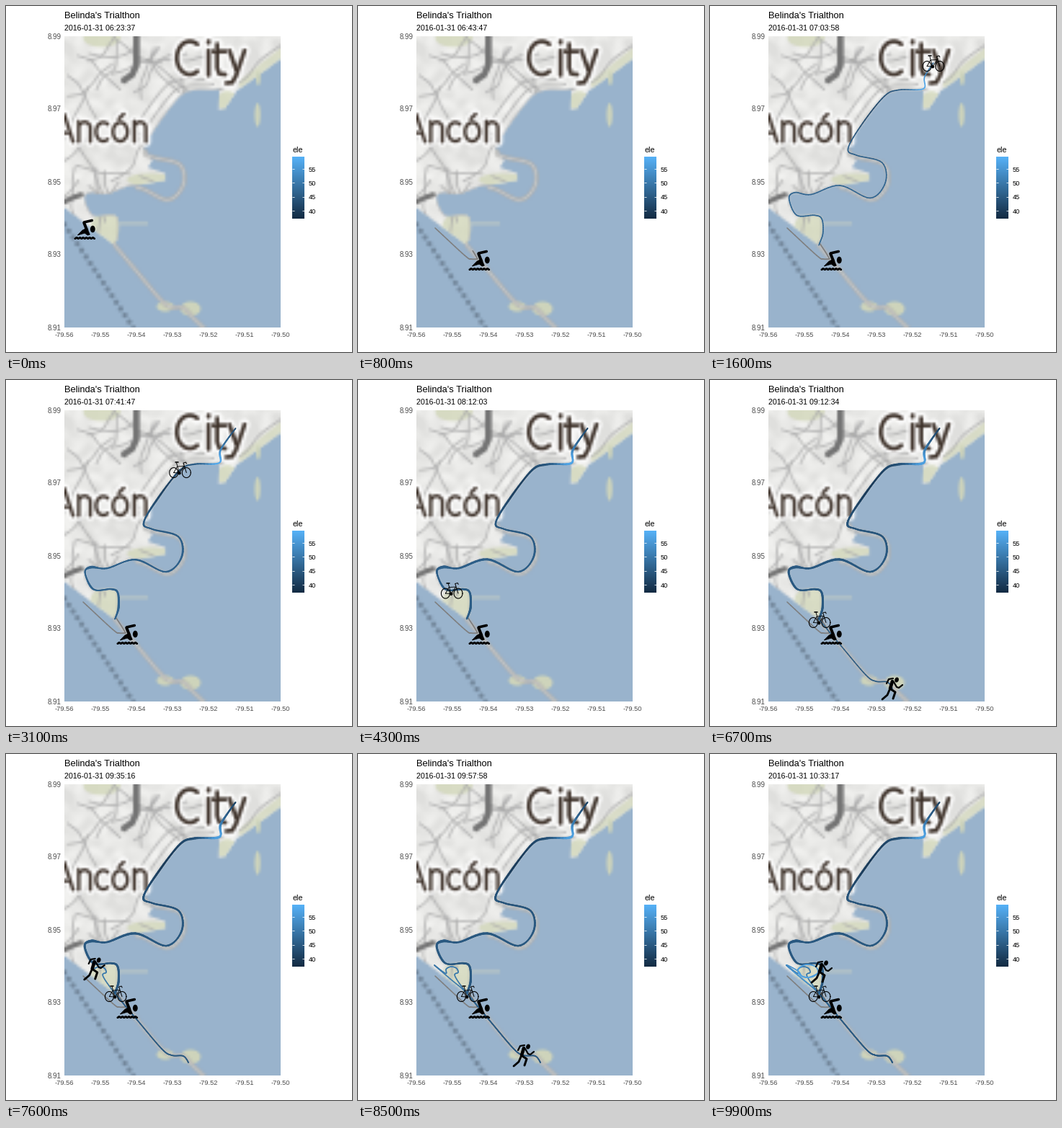
A matplotlib script for the animation above (10 s loop, 480x480 px).

```python
import numpy as np
import matplotlib.pyplot as plt
from matplotlib.animation import FuncAnimation
from matplotlib.collections import LineCollection
from matplotlib.colors import LinearSegmentedColormap
from matplotlib.lines import Line2D
from matplotlib.patches import Ellipse, Polygon
from matplotlib.path import Path
from matplotlib.transforms import Affine2D

SIZE, FRAMES = 480, 100
LEFT, RIGHT, TOP, BOTTOM = 81, 381, 42, 446
PT = 0.72  # points per pixel at 100 dpi
START, SPAN = 23017, 14980  # seconds of the day
ELE = LinearSegmentedColormap.from_list("ele", ["#132B43", "#56B1F7"])
ELE_MIN, ELE_MAX = 37.2, 59.4
STEPS = 8  # curve points per waypoint

plt.rcParams["font.family"] = "Liberation Sans"
rng = np.random.default_rng(7)


def smooth(pts):
    """Catmull-Rom curve through the waypoints."""
    p = np.array(pts, float)
    q = np.vstack([2 * p[0] - p[1], p, 2 * p[-1] - p[-2]])
    a, b, c, d = (q[k:len(p) - 1 + k, None] for k in range(4))
    u = np.linspace(0, 1, STEPS, endpoint=False)[None, :, None]
    curve = 0.5 * (2 * b + (c - a) * u + (2 * a - 5 * b + 4 * c - d) * u**2
                   + (3 * b - a - 3 * c + d) * u**3)
    return np.vstack([curve.reshape(-1, 2), p[-1:]])


def arc(cx, cy, rx, ry, start=0, stop=360, n=24):
    a = np.radians(np.linspace(start, stop, n))
    return np.column_stack([cx + rx * np.cos(a), cy + ry * np.sin(a)])


def near(x, y, cx, cy, r):
    return np.exp(-((x - cx) ** 2 + (y - cy) ** 2) / r**2)


# ---- courses: the bike road also gives the coastline ----
ROUTE = [(151, 332), (156, 316), (155, 295), (146, 290), (121, 290), (109, 267),
         (118, 259), (140, 261), (180, 249), (222, 266), (244, 245), (239, 217),
         (203, 207), (191, 198), (212, 163), (242, 125), (262, 117), (296, 115),
         (298, 97), (318, 67)]
OUT = [(151, 332), (182, 369), (216, 409), (230, 418), (246, 419), (253, 428)]
TIP, RETURN = (106, 293), (128, 312)
road = smooth(ROUTE)
south = road[:8 * STEPS + 1]
loop = road[8 * STEPS:13 * STEPS + 1]
north = road[13 * STEPS:17 * STEPS + 1]

# ---- base map: painted on a coarse grid, shown with bilinear scaling ----
COLS, ROWS = 88, 118
CELL = (RIGHT - LEFT) / COLS
GX, GY = np.meshgrid(LEFT + (np.arange(COLS) + 0.5) * CELL,
                     TOP + (np.arange(ROWS) + 0.5) * (BOTTOM - TOP) / ROWS)
base = np.full((ROWS, COLS, 3), (153.0, 179.0, 204.0))


def distance(pts):
    best = np.full(GX.shape, 1e9)
    for (x0, y0), (x1, y1) in zip(pts[:-1], pts[1:]):
        dx, dy = x1 - x0, y1 - y0
        u = ((GX - x0) * dx + (GY - y0) * dy) / max(dx * dx + dy * dy, 1e-9)
        u = np.clip(u, 0, 1)
        best = np.minimum(best, np.hypot(GX - x0 - u * dx, GY - y0 - u * dy))
    return best


def line(pts, width):
    return np.clip(0.5 + (width / 2 - distance(pts)) / CELL, 0, 1)


def area(pts):
    ring = np.vstack([pts, pts[:1]])
    inside = Path(ring).contains_points(np.column_stack([GX.ravel(), GY.ravel()]))
    sign = np.where(inside.reshape(GX.shape), 1, -1)
    return np.clip(0.5 + sign * distance(ring) / CELL, 0, 1)


def paint(mask, color):
    global base
    base = base + mask[..., None] * (np.asarray(color, float) - base)


def relief():
    z = rng.random((ROWS, COLS))
    for _ in range(5):
        z = (z + sum(np.roll(z, s, ax) for s in (-1, 1) for ax in (0, 1))) / 5
    return 5 * np.clip((z - z.mean()) / z.std(), -2, 2)


def street():
    """Wandering street that keeps to one of two crossing directions."""
    p = rng.uniform((LEFT, TOP), (250, 250))
    heading = rng.choice([0.3, 1.9]) + rng.normal(0, 0.25)
    pts = [p]
    for _ in range(4):
        heading += rng.normal(0, 0.3)
        pts.append(pts[-1] + 19 * np.array([np.cos(heading), np.sin(heading)]))
    return smooth(pts)


def letter_n(x, top, bottom):
    arch = arc(x + 8, top + 9, 8, 8, 180, 360, 12)
    return [[(x, top), (x, bottom)], np.vstack([arch, [(x + 16, bottom)]])]


def paint_label(strokes, pen):
    halo = np.max([line(s, pen + 10) for s in strokes], axis=0)
    ink = np.max([line(s, pen) for s in strokes], axis=0)
    paint(0.85 * halo, (255, 255, 255))
    paint(ink, (61, 49, 41))


def paint_map():
    global base
    land = area(np.vstack([
        [(60, 20), (420, 20), (420, 44), (352, 95), (320, 118), (304, 142),
         (295, 144), (296, 120)], north[::-1],
        [(203, 214), (197, 224), (221, 232), (221, 242)], south[::-1],
        [(81, 280), (60, 266)]]))
    paint(land, (233, 233, 231))
    base = base + (relief() * land)[..., None]

    for ellipse in [(140, 310, 24, 24), (200, 241, 32, 9), (307, 132, 14, 14),
                    (133, 44, 26, 13)]:
        paint(0.8 * area(arc(*ellipse)) * land, (212, 217, 188))
    paint(0.7 * line([(410, 44), (330, 108)], 14) * land, (212, 217, 188))
    for ellipse in [(221, 417, 12, 7), (256, 420, 14, 10), (349, 151, 4, 16),
                    (350, 100, 3, 10)]:
        paint(area(arc(*ellipse)), (206, 212, 187))
    paint(line([(158, 302), (195, 302)], 2.5), (205, 211, 196))

    streets = [street() for _ in range(34)]
    streets += [north - k * np.array([1, 0.7]) for k in (0, 9, 20)]
    streets += [south, smooth([(296, 116), (330, 102), (352, 76), (385, 52)])]
    for pts in streets:
        paint(0.8 * line(pts, 2.6) * land, (170, 170, 170))

    causeway = smooth(OUT[:5] + [(260, 433), (278, 450)])
    for pts in (loop + (2, 3), causeway):
        paint(0.8 * line(pts, 6.5), (178, 177, 175))
        paint(0.8 * line(pts, 1.5), (214, 214, 212))
    for pts, width in [([(181, 38), (181, 82), (175, 95), (164, 103)], 9),
                       ([(75, 275), (90, 267), (104, 262)], 7)]:
        paint(line(pts, width), (116, 116, 116))

    for u in np.linspace(0, 1, 17):
        dot = (81 + 96 * u, 303 + 144 * u)
        paint(line([dot, dot], 7), (114, 134, 154))

    paint_label([arc(255, 72, 18, 23, 55, 305),
                 [(281, 62), (281, 96)], [(281, 49), (281, 51)],
                 [(293, 53), (293, 86), (296, 94), (304, 95)],
                 [(287, 63), (304, 63)], [(310, 62), (321, 93)],
                 [(331, 62), (319, 97), (314, 106), (306, 107)]], 5.6)
    paint_label([[(70, 188), (81, 151), (93, 188)], [(74, 176), (89, 176)],
                 *letter_n(101, 160, 188), arc(135, 174.5, 10, 13, 55, 305),
                 arc(158.5, 174.5, 10, 13), [(157, 156), (163, 150)],
                 *letter_n(178, 160, 188)], 4.6)


paint_map()

# ---- figure ----
fig = plt.figure(figsize=(SIZE / 100, SIZE / 100), dpi=100, facecolor="white")
ax = fig.add_axes([0, 0, 1, 1])
ax.imshow(np.clip(base, 0, 255).astype(np.uint8), interpolation="bilinear",
          extent=(LEFT, RIGHT, BOTTOM, TOP), aspect="auto", zorder=0)
ax.imshow(np.linspace(1, 0, 86)[:, None], cmap=ELE, vmin=0, vmax=1,
          extent=(397, 414, 295, 209), aspect="auto", zorder=0)
ax.set(xlim=(0, SIZE), ylim=(SIZE, 0))
ax.axis("off")


def label(x, y, text, px=9.4, color="black", ha="left"):
    return ax.text(x, y, text, fontsize=px * PT, color=color, ha=ha, va="baseline")


label(81, 17, "Belinda's Trialthon", 12.9)
clock = label(81, 34, "", 10.6)
for k in range(5):
    label(77, 45.5 + 101 * k, f"{8.99 - 0.02 * k:.2f}", 9.8, "#4D4D4D", "right")
for k in range(7):
    label(81 + 49.9 * k, 459, f"{-79.56 + 0.01 * k:.2f}", 9.4, "#4D4D4D", "center")
label(397, 203, "ele", 10.6)
for k in range(4):
    y = 226 + 19.4 * k
    label(420, y + 3.7, str(55 - 5 * k))
    for x in (397, 410.6):
        ax.plot([x, x + 3.4], [y, y], color="white", lw=0.8 * PT, solid_capstyle="butt")


# ---- tracks ----
class Track:
    """Curve through waypoints; keys pair a time in steps with a waypoint."""

    def __init__(self, pts, keys):
        self.xy = smooth(pts)
        length = np.r_[0, np.cumsum(np.hypot(*np.diff(self.xy, axis=0).T))]
        times, stops = np.array(keys, float).T
        self.t = np.interp(length, length[(stops * STEPS).astype(int)], times)
        self.segs = np.stack([self.xy[:-1], self.xy[1:]], axis=1)
        self.line = LineCollection([], linewidths=1.6 * PT, capstyle="round",
                                   colors="#7F7F7F", zorder=2)
        ax.add_collection(self.line, autolim=False)

    def shade(self, height):
        ele = height(*self.xy.T, self.t)[:-1]
        self.line.set_color(ELE((ele - ELE_MIN) / (ELE_MAX - ELE_MIN)))

    def at(self, step):
        return [np.interp(step, self.t, self.xy[:, k]) for k in (0, 1)]

    def reveal(self, step):
        n = np.searchsorted(self.t, step, side="right")
        self.line.set_segments(self.segs[:max(n - 1, 0)])


def ride_height(x, y, t):
    return (47 + 12 * near(x, y, 293, 113, 16) - 5 * near(x, y, 225, 150, 45)
            - 4 * near(x, y, 322, 62, 16) + 3 * near(x, y, 298, 95, 14)
            - 0.05 * (t - 8))


def run_height(x, y, t):
    return 45 + near(x, y, 130, 302, 45) * (4 + 9 * ((t - 60) / 39) ** 2)


swim = Track([(107, 308), (148, 346), (157, 351), (166, 351)], [(0, 0), (7.6, 3)])
change = Track([(166, 351), (160, 341), (152, 329)], [(7.6, 0), (8.3, 2)])

last = len(ROUTE) - 1
ride = np.array(ROUTE + 3 * (ROUTE[-2::-1] + ROUTE[1:]), float)[:6 * last + 1]
ride += rng.normal(0, 0.45, ride.shape)
bike = Track(ride, [(8.3, 0), (16, last - 0.4), (31, 2 * last + 15),
                    (56, 6 * last - 9.5), (60.3, 6 * last)])
bike.shade(ride_height)

lap = OUT + OUT[-2::-1]
beach = [*arc(130, 302, 9, 7, 60, -200, 6), TIP, RETURN]
finish = [RETURN, TIP, *arc(136, 301, 14, 9, 180, -270, 9), (155, 302)]
jog = lap + beach + lap + finish
run = Track(jog, [(60.5, 0), (67, len(OUT) - 1),
                  (85, len(lap) + len(beach) + 3), (99, len(jog) - 1)])
run.shade(run_height)


# ---- icons, drawn around their own centre ----
class Icon:
    def __init__(self, zorder):
        self.move, self.parts, self.z = Affine2D(), [], zorder

    def add(self, part):
        part.set_transform(self.move + ax.transData)
        part.set_zorder(self.z)
        self.parts.append(ax.add_artist(part))

    def line(self, pts, width):
        x, y = zip(*pts)
        self.add(Line2D(x, y, color="black", lw=width * PT,
                        solid_capstyle="round", solid_joinstyle="round"))

    def blob(self, x, y, rx, ry, angle=0):
        self.add(Ellipse((x, y), 2 * rx, 2 * ry, angle=angle, fc="black", ec="none"))

    def place(self, xy, visible):
        self.move.clear().translate(*xy)
        for part in self.parts:
            part.set_visible(visible)


swimmer = Icon(4)
swimmer.line([(-1, -10), (10, -12.5)], 3.6)
swimmer.line([(-1, -9), (3, 1)], 4)
swimmer.add(Polygon([(-10, 8), (-3, 1), (3, -2), (7, 7), (4, 8), (0, 5)],
                    fc="black", ec="black", lw=0.6))
swimmer.blob(11, -0.5, 3.4, 4.8)
wave = np.linspace(-13.5, 13.5, 60)
swimmer.line(list(zip(wave, 12 + 0.7 * np.cos(wave * 1.4))), 2.8)

cycle = Icon(5)
for hub in (-8.8, 8.8):
    cycle.line(arc(hub, 4.5, 6, 7), 1.1)
cycle.line([(-8.8, 4.5), (-4, -4), (5.5, -4.5), (-1, 5), (-8.8, 4.5)], 0.9)
cycle.line([(-1, 5), (-5, -9)], 0.9)
cycle.line([(-7, -10), (-3, -10)], 1.6)
cycle.line([(8.8, 4.5), (4.5, -9), (8, -10), (9, -8)], 1)
cycle.blob(-1, 5.2, 2.2, 2.2)

runner = Icon(6)
runner.blob(6, -12, 2.8, 3.6, 20)
runner.line([(1, -14), (-5, -13), (-8, -7)], 2.2)
runner.line([(0, -10), (-3, 0)], 4.6)
runner.line([(2, -9), (6, -2), (9, -1), (14, -5)], 2.2)
runner.line([(-2, 1), (4, 5), (1, 14)], 3)
runner.line([(-4, 2), (-7, 9), (-14, 15)], 2.8)


def update(i):
    s = START + int(i * SPAN / (FRAMES - 1))
    clock.set_text(f"2016-01-31 {s // 3600:02d}:{s // 60 % 60:02d}:{s % 60:02d}")
    for track in (swim, change, bike, run):
        track.reveal(i)
    x, y = swim.at(i)
    swimmer.place((x + 2.3, y + 2), True)
    cycle.place(bike.at(i), i >= bike.t[0])
    runner.place(run.at(i), i >= run.t[0])
    return ()


anim = FuncAnimation(fig, update, frames=FRAMES, interval=100, repeat=True,
                     repeat_delay=0, blit=False)
plt.show()
```
